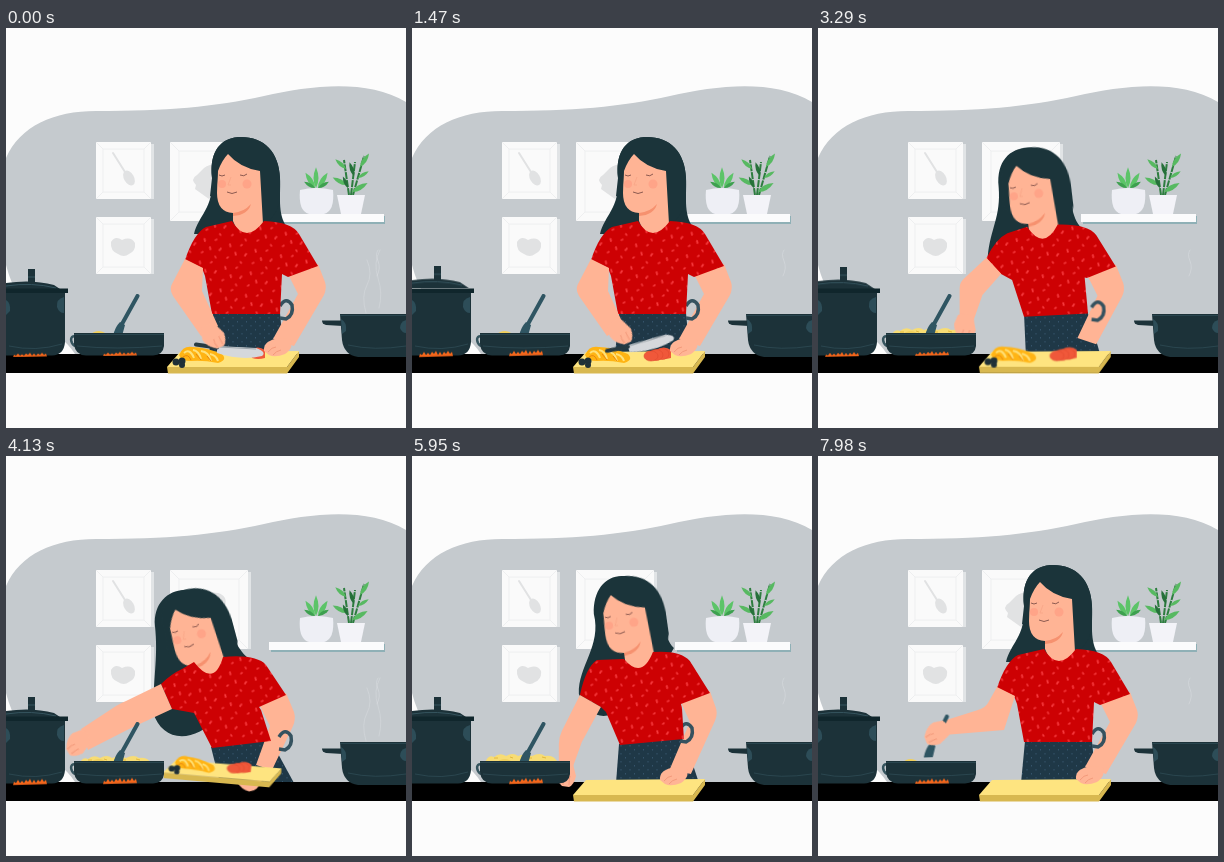
An HTML page without scripts that plays this animation: 400 px wide and 400 px high, repeating every 8000 ms.

```html
<!DOCTYPE html>
<html lang="en">
<head>
<meta charset="utf-8">
<title>Cooking</title>
<style>
html, body { margin: 0; width: 100%; height: 100%; overflow: hidden; background: #fcfcfc; }
svg { display: block; width: 100vw; height: 100vh; }
.a { animation: 8s ease-in-out infinite; }
.skin { fill: #ffb495; }
.hair { fill: #1b343a; }
.iron { fill: #1c3239; }
.edge { fill: none; stroke: #35545e; }
.steam { fill: none; stroke: #e6e9ec; stroke-linecap: round; opacity: 0; }

/* Poses: upright, reaching, pouring, returning, upright */
#head { transform-origin: 240px 185px; animation-name: head; }
@keyframes head {
  0%, 34.4%, 82%, 100% { transform: translate(0, 0) rotate(0deg); }
  48.8%, 53% { transform: translate(-38px, 21px) rotate(-15deg); }
  61.5% { transform: translate(-51px, 33px) rotate(-22deg); }
  66.9% { transform: translate(-51px, 33px) rotate(-22deg); animation-timing-function: ease-in; }
  74.4% { transform: translate(-15px, 10px) rotate(-8deg); animation-timing-function: ease-out; }
}
#mane { animation-name: mane; }
@keyframes mane {
  0%, 34.4%, 82%, 100% { d: path("M235 109C216 109 203 122 206 150C208 180 192 188 188 206C210 206 250 206 281 199C271 186 275 165 274 150C273 124 258 109 235 109Z"); }
  48.8%, 53% { d: path("M180 134C163 133 147 147 149 170C152 200 148 215 147 256C160 300 220 285 243 203C228 190 228 178 219 160C212 142 198 134 180 134Z"); }
  61.5% { d: path("M154 147C136 147 119 160 121 182C130 215 118 235 118 262C130 315 190 300 229 203C210 196 206 185 197 170C188 154 172 147 154 147Z"); }
  66.9% { d: path("M154 147C136 147 119 160 121 182C130 215 118 235 118 262C130 315 190 300 229 203C210 196 206 185 197 170C188 154 172 147 154 147Z"); animation-timing-function: ease-in; }
  74.4% { d: path("M210 120C193 120 181 135 182 158C190 190 166 210 167 238C185 285 230 250 262 192C250 180 254 160 250 148C246 128 230 120 210 120Z"); animation-timing-function: ease-out; }
}
#shirt { animation-name: shirt; }
@keyframes shirt {
  0%, 34.4%, 82%, 100% { d: path("M226 193Q240 217 258 193Q286 194 293 206L312 238L282 249L276 246L274 286L206 286L199 248L196 240L179 232Q188 205 200 199Z"); }
  48.8%, 53% { d: path("M188 206Q208 232 217 201Q250 198 260 209L280 239L253 251L255 254L265 285L206 292L188 257L166 253L155 228Q165 218 176 213Z"); }
  61.5% { d: path("M173 222Q192 248 201 212Q228 199 241 204L264 238L238 252L238 256L244 288L207 294L190 274L152 273L138 249Q150 236 160 229Z"); }
  66.9% { d: path("M173 222Q192 248 201 212Q228 199 241 204L264 238L238 252L238 256L244 288L207 294L190 274L152 273L138 249Q150 236 160 229Z"); animation-timing-function: ease-in; }
  74.4% { d: path("M212 203Q230 224 241 196Q268 194 278 205L298 237L269 248L270 251L272 283L208 289L194 256L189 251L168 239Q174 211 185 204Z"); animation-timing-function: ease-out; }
}
#skirt { animation-name: skirt; }
@keyframes skirt {
  0%, 34.4%, 82%, 100% { d: path("M207 285L274 285L278 327L203 327Z"); }
  48.8%, 53% { d: path("M205 291L264 283L288 327L214 327Z"); }
  61.5% { d: path("M207 290L268 282L292 327L207 327Z"); }
  66.9% { d: path("M207 290L268 282L292 327L207 327Z"); animation-timing-function: ease-in; }
  74.4% { d: path("M207 288L272 282L287 327L204 327Z"); animation-timing-function: ease-out; }
}
#bow { animation-name: bow; }
@keyframes bow {
  0%, 34.4%, 82%, 100% { transform: translate(0, 0); }
  48.8%, 53% { transform: translate(-1px, 3px); }
  61.5%, 66.9% { transform: translate(-1px, -5px); }
  74.4% { transform: translate(-6px, -5px); }
}
#armR { animation-name: armR; }
@keyframes armR {
  0%, 34.4%, 82%, 100% { d: path("M312 236L319 254Q321 260 318 267L288 318L267 311L292 266L282 246Z"); }
  48.8%, 53% { d: path("M280 237L288 256Q290 263 287 270L266 314L250 309L264 270L253 248Z"); }
  61.5% { d: path("M263 236L272 262Q274 270 269 280L240 292L206 288L243 264L238 248Z"); }
  66.9% { d: path("M263 236L272 262Q274 270 269 280L240 292L206 288L243 264L238 248Z"); animation-timing-function: ease-in; }
  74.4% { d: path("M298 235L304 252Q306 258 303 265L279 318L258 313L278 266L269 246Z"); animation-timing-function: ease-out; }
}
#armL { animation-name: armL; }
@keyframes armL {
  0%, 34.4% { d: path("M179 231L166 256Q163 261 167 268L195 308L212 298L196 263L197 240Z"); }
  48.8%, 53% { d: path("M155 228L120 245Q115 247 110 250L75 273L82 294L125 272L166 253Z"); }
  61.5% { d: path("M138 249L104 270Q97 275 90 280L64 302L70 320L112 300L152 273Z"); }
  66.9% { d: path("M138 249L104 270Q97 275 90 280L64 302L70 320L112 300L152 273Z"); animation-timing-function: ease-in; }
  74.4% { d: path("M168 239L150 275Q147 281 147 288L147 314L160 314L170 286L189 251Z"); animation-timing-function: ease-out; }
  83%, 91.5%, 100% { d: path("M179 231L170 247Q167 252 160 254L122 266L126 279L186 274L197 240Z"); }
  87.2%, 95.7% { d: path("M179 231L169 249Q166 254 160 257L136 267L140 281L186 277L197 240Z"); }
}
#handL { animation-name: handL; }
@keyframes handL {
  0%, 34.4% { transform: translate(207px, 308px) rotate(-32deg); }
  48.8%, 53% { transform: translate(72px, 287px) rotate(50deg); }
  61.5%, 66.9% { transform: translate(65px, 311px) rotate(50deg); }
  74.4% { transform: translate(153px, 317px) rotate(0deg); }
  83%, 91.5%, 100% { transform: translate(119px, 277px) rotate(60deg); }
  87.2%, 95.7% { transform: translate(133px, 278px) rotate(60deg); }
}
#spoon { animation-name: spoon; transform-origin: 120px 287px; }
@keyframes spoon {
  0%, 80% { transform: translate(0, 0); }
  83%, 91.5%, 100% { transform: translate(-2px, -7px) rotate(-2deg); }
  87.2%, 95.7% { transform: translate(12px, -6px) rotate(8deg); }
}
#handR { animation-name: handR; }
@keyframes handR {
  0%, 34.4%, 82%, 100% { transform: translate(271px, 319px); opacity: 1; }
  41% { transform: translate(262px, 318px); opacity: 1; }
  41.1%, 72% { transform: translate(260px, 319px); opacity: 0; }
  72.1%, 74.4% { transform: translate(261px, 320px); opacity: 1; }
}
#under { animation-name: under; }
@keyframes under {
  0%, 45% { opacity: 0; transform: translateX(0); }
  45.1%, 53% { opacity: 1; transform: translateX(0); }
  61.5%, 70% { opacity: 1; transform: translateX(-52px); }
  70.1%, 100% { opacity: 0; transform: translateX(-52px); }
}
#board { transform-origin: 174px 324px; animation-name: board; }
@keyframes board {
  0%, 40.5%, 73.6%, 100% { transform: translate(0, 0) rotate(0deg) scale(1); }
  48.8%, 53% { transform: translate(-4px, -20px) rotate(5deg) scale(.89); }
  61.5%, 66.9% { transform: translate(-13px, -46px) rotate(5.5deg) scale(.89); }
}
#food { animation-name: food; }
@keyframes food {
  0%, 57% { transform: translate(0, 0); opacity: 1; }
  63.5% { transform: translate(-58px, 14px); opacity: 1; }
  63.6%, 100% { transform: translate(-58px, 14px); opacity: 0; }
}
#chopHand { animation-name: chopHand; }
@keyframes chopHand {
  0%, 7.5%, 15%, 22.5%, 30%, 100% { transform: translate(0, 0); }
  3.7%, 11.2%, 18.6%, 26.2% { transform: translate(3px, -3px); }
}
#knife { animation-name: knife; transform-origin: 212px 320px; }
@keyframes knife {
  0%, 7.5%, 15%, 22.5%, 30%, 36.5% { transform: translate(0, 0); opacity: 1; }
  3.7%, 11.2%, 18.6%, 26.2% { transform: translate(5px, -1px) rotate(-19deg); }
  36.6%, 100% { transform: translate(0, 0); opacity: 0; }
}
#slices { animation: slices 8s step-end infinite; }
@keyframes slices { 0% { opacity: 0; } 7.5%, 100% { opacity: 1; } }

/* Stove */
#lid { animation-name: lid; }
@keyframes lid {
  0%, 4%, 8%, 12%, 16%, 20%, 24%, 28%, 32%, 36%, 40%, 44%, 48%, 100% { transform: translateY(0); }
  2%, 6%, 10%, 14%, 18%, 22%, 26%, 30%, 34%, 38%, 42%, 46% { transform: translateY(-3px); }
}
#bits { animation-name: bits; }
@keyframes bits {
  0%, 18%, 100% { transform: translateY(6px); }
  30%, 52% { transform: translateY(1px); }
  65% { transform: translateY(4px); }
  74%, 80% { transform: translateY(-1px); }
}
#added { animation: added 8s step-end infinite; }
@keyframes added { 0%, 72% { opacity: 0; } 62.5% { opacity: 1; } }
.fire { fill: #f4661b; animation: flick .28s linear infinite alternate; }
@keyframes flick { from { transform: scaleY(.7); } to { transform: scaleY(1.15); } }
#potFire { animation-name: off; }
@keyframes off { 0%, 58% { opacity: 1; } 65%, 99.9% { opacity: 0; } 100% { opacity: 1; } }
#s1 { animation-name: steam1; }
@keyframes steam1 { 0%, 50%, 54% { opacity: .3; } 9%, 43%, 62%, 100% { opacity: 0; } }
#s2 { opacity: .35; }
#s3 { animation-name: steam3; }
@keyframes steam3 { 0%, 24%, 37%, 100% { opacity: 0; } 30% { opacity: .6; } }
</style>
</head>
<body>
<svg viewBox="0 0 400 400">
  <defs>
    <pattern id="dots" width="26" height="23" patternUnits="userSpaceOnUse" patternTransform="rotate(12)">
      <rect width="26" height="23" fill="#cd0103"/>
      <path d="M4 4l1 2M16 2l-1 1M11 11l1 2M22 10l-1 2M4 18l1-1M18 19l1 1" stroke="#f73a3e" stroke-width="1.700" stroke-linecap="round"/>
    </pattern>
    <pattern id="weave" width="9" height="8" patternUnits="userSpaceOnUse">
      <rect width="9" height="8" fill="#1f3847"/>
      <path d="M2 1v1.500M6.500 5v1.500" stroke="#35536a"/>
    </pattern>
    <path id="leaf" d="M0 0Q-5-8 0-18Q5-8 0 0"/>
    <path id="flames" d="M0 0l1-3 2 1 2-3 2 3 2-2 2 2 2-3 2 2 2-3 2 4 2-3 2 3 2-3 2 2 2-3 2 3 2-2 1 4z"/>
  </defs>

  <path fill="#c5cace" d="M0 130C14 98 48 83 90 83C160 83 209 79 258 68C306 57 362 51 400 74V326H69C52 299 13 289 0 237Z"/>

  <!-- Pictures -->
  <g id="pictures">
    <path fill="#e1e4e6" d="M93 116h55v55h-55zM167 116h78v77h-78zM93 191h55v55h-55z"/>
    <path fill="#fafafa" d="M90 114h55v57h-55zM164 114h78v79h-78zM90 189h55v57h-55z"/>
    <g fill="none" stroke="#eeeff0">
      <path d="M97 121h41v43h-41zM173 123h60v61h-60zM97 196h41v43h-41z"/>
      <path d="M90 114l7 7M145 114l-7 7M90 171l7-7M145 171l-7-7M164 114l9 9M242 114l-9 9M242 193l-9-9M164 193l9-9M90 189l7 7M145 189l-7 7M90 246l7-7M145 246l-7-7"/>
    </g>
    <g fill="#e1e2e3">
      <path d="M107 125l12 19" stroke="#e1e2e3" stroke-width="2" stroke-linecap="round"/>
      <ellipse cx="123" cy="150" rx="5" ry="8" transform="rotate(-30 123 150)"/>
      <path d="M116 212Q109 207 105 214Q104 223 112 226Q118 230 123 226Q130 223 129 215Q125 208 116 212Z"/>
      <path d="M190 157Q184 151 191 147L198 140Q204 135 212 137Q222 140 219 150L209 166L203 171L189 161Z"/>
    </g>
  </g>

  <!-- Shelf and plants -->
  <path fill="#8fb0b6" d="M265 188h114v8H265z"/>
  <path fill="#fbfbfc" d="M263 186h115v8H263z"/>
  <g fill="#5cc468">
    <use href="#leaf" transform="translate(310 160) scale(1 1.150)"/>
    <use href="#leaf" transform="translate(309 160) rotate(-32)"/>
    <use href="#leaf" transform="translate(312 160) rotate(32)"/>
    <use href="#leaf" transform="translate(309 160) rotate(-60) scale(.7)" fill="#3da04f"/>
    <use href="#leaf" transform="translate(312 160) rotate(60) scale(.7)" fill="#3da04f"/>
  </g>
  <path fill="#eeeff5" d="M294 162Q292 183 303 186H318Q329 183 327 162Q310 158 294 162Z"/>
  <path d="M343 167L338 132M345 167L349 134M347 167L358 128" fill="none" stroke="#2d7d3f" stroke-width="2" stroke-dasharray="7 1"/>
  <g fill="#57b961">
    <use href="#leaf" transform="translate(340 141) rotate(-48) scale(.8)"/>
    <use href="#leaf" transform="translate(341 157) rotate(-62) scale(.9)"/>
    <use href="#leaf" transform="translate(346 164) rotate(60)"/>
    <use href="#leaf" transform="translate(352 150) rotate(58) scale(.7)"/>
    <use href="#leaf" transform="translate(354 139) rotate(34) scale(.9)"/>
    <use href="#leaf" transform="translate(342 160) rotate(-24) scale(.7)" fill="#26703a"/>
    <use href="#leaf" transform="translate(348 148) rotate(-18) scale(.8)" fill="#26703a"/>
  </g>
  <path fill="#f3f3f8" d="M331 167h28l-4 19h-20z"/>

  <path class="steam a" id="s1" d="M360 285Q355 268 361 257T361 232M373 280Q377 265 372 250T374 222"/>
  <path class="steam" id="s2" d="M371 248Q375 240 372 233T372 222"/>
  <path class="steam a" id="s3" d="M112 296Q108 287 112 280T111 267"/>

  <!-- Cook -->
  <path class="a" id="skirt" fill="url(#weave)" d="M207 285L274 285L278 327L203 327Z"/>
  <path class="hair a" id="mane"/>
  <path class="skin a" id="armR"/>
  <g class="a" id="bow"><path d="M274 278Q280 268 286 277Q288 287 280 291L274 290" fill="none" stroke="#35525f" stroke-width="3.500"/></g>
  <g class="a" id="head">
    <path class="skin" d="M212 132L211 165Q211 184 227 185V193Q240 224 259 194V140L225 120Z"/>
    <path fill="#f6916f" d="M227 185Q238 184 245 176Q242 187 227 188Z"/>
    <path class="hair" d="M206 150C203 122 216 109 235 109C258 109 273 124 274 150V172Q270 190 257 196L254 143Q234 140 222 126Q216 132 212 143L210 170L204 168Z"/>
    <circle cx="216" cy="156" r="4" fill="#ff9c83" opacity=".7"/>
    <circle cx="241" cy="156" r="4.500" fill="#ff9c83" opacity=".7"/>
    <path d="M213 147q3 2 6 0M234 147q4 2 7-1M221 164q5 3 10 0" fill="none" stroke="#70453f" stroke-width=".8"/>
    <path d="M225 149l-3 8h3" fill="none" stroke="#f8a587" stroke-width=".8"/>
  </g>
  <path class="a" id="shirt" fill="url(#dots)"/>

  <path d="M0 326h400v19H0z"/>

  <!-- Board -->
  <g class="a" id="board">
    <path class="skin a" id="under" d="M244 342L272 338Q269 351 259 352Q250 351 244 342Z"/>
    <path fill="#d8b850" d="M161 339H281L293 323V329L281 345.500H162Z"/>
    <path fill="#fee480" d="M174 324L293 323L281 339H161Z"/>
    <g class="a" id="food">
      <path fill="#ffb414" d="M173 327Q177 317 187 319Q199 319 216 326Q222 332 212 335Q197 332 185 333Q175 333 173 327Z"/>
      <path d="M178 325q6-5 10 5M187 322q6 1 8 9M195 323q8 1 10 10M204 326q6 1 8 7" fill="none" stroke="#ffe27a" stroke-width="2"/>
      <path d="M177 329q5-4 8 3M190 326l5 6M201 328l4 5" fill="none" stroke="#e8850e"/>
      <g fill="#1f3037"><circle cx="170" cy="334" r="3.500"/><circle cx="176" cy="333" r="3.500"/><circle cx="176" cy="337" r="3"/></g>
      <path fill="#f0583a" d="M244 322Q252 317 259 322V330Q252 332 246 330Z"/>
      <g id="slices" fill="#f0583a" stroke="#e04a30" stroke-width=".6">
        <ellipse cx="250" cy="326" rx="7" ry="5.500"/><ellipse cx="244" cy="327" rx="7" ry="5.500"/><ellipse cx="239" cy="328" rx="7" ry="5"/>
      </g>
    </g>
  </g>
  <g class="a" id="knife">
    <path fill="#d5d8dc" d="M211 318L250 320Q261 324 256 328Q235 333 211 325Z"/>
    <path d="M213 319L250 321" stroke="#9ca5ab"/>
    <path d="M190 316.500L211 319.500" stroke="#263a42" stroke-width="4" stroke-linecap="round"/>
  </g>
  <g class="a" id="handR">
    <path class="skin" d="M-13 4Q-14-5-2-8L13-9Q18 0 8 7Q-2 11-8 8Z"/>
    <path d="M-9 5q4-5 8-5M-4 8q3-4 8-5" fill="none" stroke="#f39a7b"/>
  </g>
  <path class="skin a" id="armL"/>

  <!-- Pan contents and spoon -->
  <g class="a" id="bits" fill="#f7dc74">
    <path d="M73 308Q76 299 82 302Q88 297 94 301Q101 297 106 301Q113 298 120 301Q128 297 133 301Q142 299 146 308Z"/>
    <path d="M82 303h4M98 302l3 1M116 303h4M130 302l4 1" stroke="#e2b83d"/>
  </g>
  <path fill="#f0cf5c" d="M84 307Q92 299 102 307Z"/>
  <g id="added">
    <path fill="#e94b2d" d="M121 307Q126 299 137 301L146 303L144 308Z"/>
    <path fill="#1f3037" d="M113 307q4-7 9-4l-1 5zM134 303l6-2 2 4z"/>
    <path fill="#f6a71c" d="M127 304l6-2 2 4z"/>
  </g>
  <g class="a" id="spoon">
    <path d="M131.500 268L116 296" stroke="#2f5562" stroke-width="4" stroke-linecap="round"/>
    <path fill="#2f5562" d="M114 294L119 297L116 308H107Q109 299 114 294Z"/>
  </g>
  <g class="a" id="handL">
    <g class="a" id="chopHand">
      <path class="skin" d="M-8-11Q2-16 8-9L11 3Q9 12 4 14L-3 13Q-11 6-11-2Z"/>
      <path d="M-2 12q-1-6 1-9M4 12q0-6 1-9" fill="none" stroke="#f39a7b"/>
    </g>
  </g>

  <!-- Pan -->
  <path d="M70 308Q63 308 66 315Q68 319 73 318" class="edge" stroke-width="2.500"/>
  <path class="iron" d="M68 305H158V318Q157 327 147 327.500H80Q69 327 68 316Z"/>
  <path class="edge" d="M68 306.500H158M71 318Q110 322 156 318" opacity=".6"/>
  <g transform="translate(97 328)"><use href="#flames" class="fire"/></g>

  <!-- Tall pot -->
  <g class="a" id="lid">
    <path class="iron" d="M22 241h7v13h-7zM0 255Q26 251 48 257L57 263H0Z"/>
    <path class="edge" d="M0 258Q26 254 50 260M22 249h7"/>
  </g>
  <path class="iron" d="M0 262H59V314Q58 327 46 327.500H0Z"/>
  <path fill="#10262c" d="M0 260.500H62V265H0Z"/>
  <path fill="#2d4d58" d="M58 269Q50 271 51 279Q53 285 58 285Z"/>
  <path fill="#2d4d58" d="M0 272Q5 275 4 283L0 287Z"/>
  <path class="edge" d="M3 318Q30 324 56 316" opacity=".6"/>
  <g class="a" id="potFire"><g transform="translate(7 329)"><use href="#flames" class="fire"/></g></g>

  <!-- Side pot -->
  <path class="iron" d="M316 292.500H337V298L320 297Q316 296 316 292.500Z"/>
  <path class="iron" d="M334 286H400V329H352Q338 327 336 312Z"/>
  <path fill="#2d4d58" d="M335 291Q341 294 340 303L336 306Z"/>
  <path fill="#2d4d58" d="M400 292Q394 294 394 300Q396 305 400 305Z"/>
  <path class="edge" d="M334 287.500H400M342 317Q368 323 400 318" opacity=".6"/>
</svg>
</body>
</html>
```
